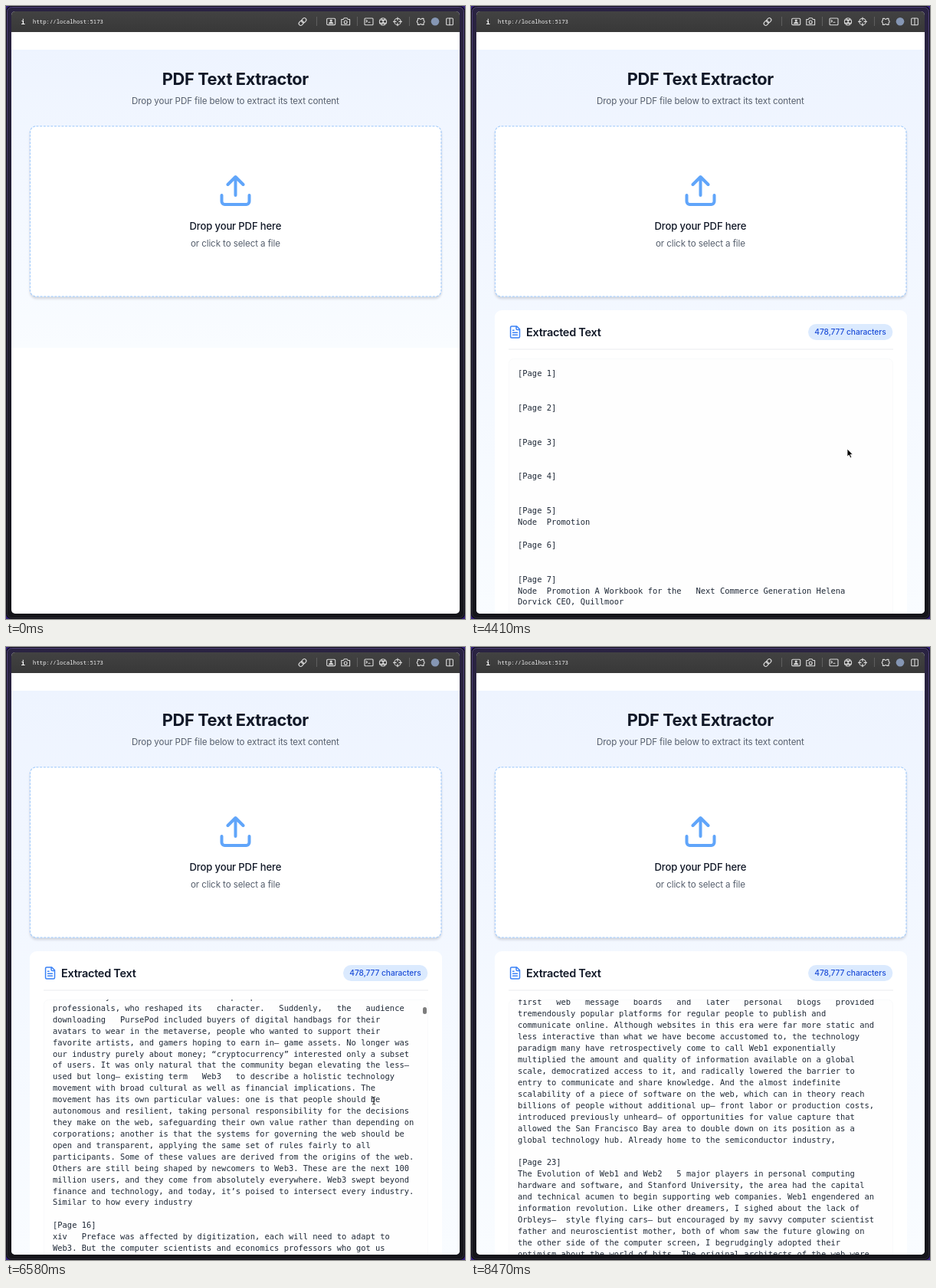
Write an HTML page that moves like this. It is 599x800 px and loops after 8610 ms.

```html
<!DOCTYPE html>
<html lang="en">
<head>
<meta charset="utf-8">
<title>PDF Text Extractor</title>
<style>
  html, body { margin: 0; width: 100%; height: 100%; overflow: hidden; }
  body { position: relative; background: #1b1a26; }
  svg { position: absolute; left: 0; top: 0; width: 599px; height: 800px; }
  text { font-family: Inter, sans-serif; }
  .mid { text-anchor: middle; }
  .title { font-size: 21.8px; font-weight: 700; letter-spacing: -.36px; fill: #111827; }
  .sub { font-size: 11.6px; letter-spacing: -.1px; fill: #565f6d; }
  .lead { font-size: 13.1px; font-weight: 500; letter-spacing: -.16px; fill: #111827; }
  .head { font-size: 14.5px; font-weight: 600; letter-spacing: -.27px; fill: #111827; }
  .count { font-size: 10.2px; font-weight: 500; letter-spacing: -.05px; fill: #1d4ed8; }
  .url { font: 500 7.3px "Noto Sans Mono", monospace; fill: #f2f2f2; }
  .line { fill: none; stroke-width: 2; stroke-linecap: round; stroke-linejoin: round; }
  #scroller { position: absolute; left: 49px; top: 460px; width: 502px; height: 333px; overflow: hidden; }
  pre { position: absolute; left: 12px; top: 12px; margin: 0; color: #1f2937;
        font: 10.44px/14.92px "DejaVu Sans Mono", monospace; }
  #thumb { position: absolute; left: 494.5px; top: 0; width: 5px; height: 9px; border-radius: 2.5px; background: #7d7d7d; }
</style>
</head>
<body>
<svg viewBox="0 0 599 800">
  <defs>
    <linearGradient id="edge" x2="0" y2="1">
      <stop stop-color="#2a2342"/><stop offset=".45" stop-color="#201d2f"/><stop offset="1" stop-color="#15151a"/>
    </linearGradient>
    <linearGradient id="rim" x2="0" y2="1">
      <stop stop-color="#54457e"/><stop offset=".5" stop-color="#3b3454"/><stop offset="1" stop-color="#2c2c33"/>
    </linearGradient>
    <linearGradient id="bar" x2="0" y2="1"><stop stop-color="#424242"/><stop offset="1" stop-color="#383838"/></linearGradient>
    <linearGradient id="sky" x2="0" y2="1"><stop stop-color="#eef4ff"/><stop offset="1" stop-color="#f9fcff"/></linearGradient>
    <filter id="shadow" x="-5%" y="-5%" width="110%" height="115%">
      <feDropShadow dx="0" dy="2.5" stdDeviation="1.8" flood-color="#1e293b" flood-opacity=".2"/>
    </filter>
    <clipPath id="window"><rect x="7" y="7" width="585" height="786" rx="5"/></clipPath>
  </defs>
  <rect width="599" height="800" fill="#35207c"/>
  <rect width="599" height="800" rx="7" fill="#0d0c14"/>
  <rect x="1.5" y="1.5" width="596" height="797" rx="6" fill="url(#edge)" stroke="url(#rim)"/>
  <g clip-path="url(#window)">
    <rect x="7" y="7" width="585" height="786" fill="#fff"/>
    <rect x="7" y="7" width="585" height="27" fill="url(#bar)"/>
    <rect id="page" x="7" y="57" width="585" height="389" fill="url(#sky)"/>
  </g>

  <text x="19.6" y="23.6" style="font:700 9px 'DejaVu Sans Mono',monospace" fill="#fff">i</text>
  <text class="url" x="35" y="22.9">http://localhost:5173</text>
  <g fill="none" stroke="#dcdcdc" stroke-width="1.1" stroke-linecap="round" stroke-linejoin="round">
    <path stroke="#5e5e5e" stroke-linecap="butt" d="M405.5 14v12M458.5 14v12M526.5 14v12"/>
    <g transform="rotate(-45 387 20.5)"><rect x="381.2" y="18" width="6.6" height="5" rx="2.5"/><rect x="386.2" y="18" width="6.6" height="5" rx="2.5"/></g>
    <rect x="418.7" y="16.2" width="11" height="8.4" rx="1.2"/>
    <path d="M421.5 22.6q2.7-3 5.4 0z" fill="#dcdcdc"/><circle cx="424.2" cy="19" r="1" fill="#dcdcdc"/>
    <path d="M437.8 17.5h2.4l1.2-1.8h3.6l1.2 1.8h2.4v7.3h-10.8z"/><circle cx="443.2" cy="21" r="2"/>
    <rect x="468" y="16" width="11" height="8.8" rx="1"/><path d="M470 18.4l1.5 1.3-1.5 1.3M473 21.3h2"/>
    <circle cx="492" cy="20.4" r="4.6"/><path d="M488 18.2h7.6M487.8 22.4h8M490.2 16.2l3.8 8M494.2 16.4l-4 7.8"/>
    <circle cx="511" cy="20.4" r="4.2"/><path d="M511 15v3.4M511 22.4v3.4M505.6 20.4h3.4M513 20.4h3.4"/>
    <path d="M537.4 16.4h2.4a1.5 1.5 0 0 0 2.8 0h2.4v2.4a1.7 1.7 0 0 1 0 3.2v2.4h-2.4a1.5 1.5 0 0 0-2.8 0h-2.4v-2.4a1.7 1.7 0 0 1 0-3.2z"/>
    <rect x="574.7" y="16" width="8.6" height="8.8" rx="1"/><path d="M579 16v8.8"/>
  </g>
  <circle cx="560" cy="20.3" r="5.3" fill="#8596b4"/>

  <text class="title mid" x="299.3" y="103.2">PDF Text Extractor</text>
  <text class="sub mid" x="299.4" y="127.6">Drop your PDF file below to extract its text content</text>

  <rect x="31.5" y="156.8" width="536.5" height="222.4" rx="8" fill="#fff" filter="url(#shadow)"/>
  <rect x="31.5" y="156.8" width="536.5" height="222.4" rx="8" fill="none" stroke="#abd0fb" stroke-width="1.25" stroke-dasharray="3 1.7"/>
  <g id="upload" class="line" stroke="#60a5fa" transform="translate(275.5 217) scale(2)">
    <path d="M21 15v4a2 2 0 0 1-2 2H5a2 2 0 0 1-2-2v-4M17 8l-5-5-5 5M12 3v12"/>
  </g>
  <g class="line" stroke="#3b82f6" transform="translate(275.5 217) scale(2)">
    <path id="spinner" d="M21 12a9 9 0 1 1-6.219-8.56"/>
  </g>
  <text id="lead" class="lead mid" x="299.4" y="291.6"></text>
  <text id="hint" class="sub mid" x="299.4" y="313.8"></text>

  <g id="result" clip-path="url(#window)">
    <rect x="31" y="397" width="538" height="420" rx="9" fill="#fff"/>
    <g class="line" stroke="#3b82f6" transform="translate(48.6 416.6) scale(.746)">
      <path d="M15 2H6a2 2 0 0 0-2 2v16a2 2 0 0 0 2 2h12a2 2 0 0 0 2-2V7zM14 2v4a2 2 0 0 0 2 2h4M10 9H8M16 13H8M16 17H8"/>
    </g>
    <text class="head" x="72" y="430.7">Extracted Text</text>
    <rect x="440" y="415" width="110.3" height="21" rx="10.5" fill="#dbeafe"/>
    <text class="count mid" x="495" y="429.4">478,777 characters</text>
    <path d="M49 448h502" stroke="#e9ebef"/>
    <rect x="49.5" y="460.5" width="501" height="350" rx="6" fill="#fefefe" stroke="#f9fafb"/>
  </g>
</svg>

<div id="scroller"><pre id="doc"></pre><div id="thumb"></div></div>

<svg viewBox="0 0 599 800">
  <g id="cursor">
    <path id="arrow" d="M0 0v10l2.3-2 1.7 3.8 1.7-.8L4.1 7.3h3.1z" fill="#000" stroke="#fff" stroke-width=".8"/>
    <path id="beam" d="M-2-5q2 0 2 1.5Q0-5 2-5M0-3.5v7M-2 5q2 0 2-1.5Q0 5 2 5M-1 1.5h2" fill="none" stroke="#222"/>
  </g>
</svg>

<script>
const LOOP = 8610, STEP = 70, PROCESS = 1540, DONE = 3360;
const $ = id => document.getElementById(id);

const PHRASES = ["the early web", "people who build communities", "a new kind of ownership", "and the tools they use",
  "in the years that followed", "with open protocols", "creators and their audiences", "began to change",
  "how value moves online", "for brands of every size", "across the whole industry.", "This shift", "is only beginning,",
  "because trust", "must be earned", "by listening first.", "Marketers", "learned to tell", "a different story"];

// Wraps seeded phrases into n lines for the pages that only rush past.
function filler(n, seed) {
  const lines = [];
  let line = "";
  while (lines.length < n) {
    seed = (seed * 1103 + 377) % 65521;
    for (const word of PHRASES[seed % PHRASES.length].split(" ")) {
      if ((line + word).length > 74) { lines.push(line.trim()); line = ""; }
      line += word + " ";
    }
  }
  return lines.slice(0, n).join("\n");
}

const TEXT = `[Page 1]


[Page 2]


[Page 3]


[Page 4]


[Page 5]
Node  Promotion

[Page 6]


[Page 7]
Node  Promotion A Workbook for the   Next Commerce Generation Helena
Dorvick CEO, Quillmoor

[Page 8]
Copyright © 2023 by Hale Torby & Kent, Inc. All rights reserved. Published
by Hale Torby & Kent, Inc., Velbrun, Far Tessin. Published simultaneously
in Canada. No part of this publication may be reproduced, stored in a
retrieval system, or transmitted in any form or by any means, electronic,
mechanical, photocopying, recording, scanning, or otherwise, except as
permitted under Section 107 or 108 of the 1976 United States Copyright Act,
without either the prior written permission of the Publisher, or
authorization through payment of the appropriate per– copy fee to the
Facsimile Allowance Bureau, Inc., 000 Fernmoor Drive, Calwick, ZZ 00000,
(555) 010– 0142, fax (555) 010– 0187, or on the Web at www.copyright.com.
Requests to the Publisher for permission should be addressed to the
Permissions Department, Hale Torby & Kent, Inc., 909 Larch Street, Velbrun,
${filler(27, 11)}

[Page 9]
To Ned, for your patience while I wrote this book on our vacation.

[Page 10]


[Page 11]
ix  Contents  Preface   xi  Part 1   What Is Web3?   1  Chapter 1   The
Evolution of Web1 and Web2   3 Chapter 2   The Evolution of Bitcoin and
Ethereum   15 Chapter 3   The Evolution of Ethereum into Web3   25 Chapter
4   The Metaverse   59  Part 2   Web3 Marketing in Theory and Practice   67
Chapter 5   Inventing Web3 Marketing   69 Chapter 6   Know Your Product and
Your Audience   83 Chapter 7   Build a Marketing Team   99 Chapter 8   Set
Key Metrics   105

[Page 12]
x   Contents  Part 3   The Web3 Marketing Funnel   111  Chapter 9
Introducing the Web3 Marketing Funnel   113 Chapter 10   Discovery   117
Chapter 11   Engagement and Use   151 Chapter 12   Retention   169  Part 4
Web3 Transformation and Web2.5   179  Chapter 13   Defining Web2.5   181
Conclusion   193 Notes   197 Acknowledgments   207 About the Author   209
Index   211

[Page 13]


[Page 14]
${filler(32, 23)}

[Page 15]
${filler(32, 37)}
professionals, who reshaped its   character.   Suddenly,   the   audience
downloading   PursePod included buyers of digital handbags for their
avatars to wear in the metaverse, people who wanted to support their
favorite artists, and gamers hoping to earn in– game assets. No longer was
our industry purely about money; “cryptocurrency” interested only a subset
of users. It was only natural that the community began elevating the less–
used but long– existing term   Web3   to describe a holistic technology
movement with broad cultural as well as financial implications. The
movement has its own particular values: one is that people should be
autonomous and resilient, taking personal responsibility for the decisions
they make on the web, safeguarding their own value rather than depending on
corporations; another is that the systems for governing the web should be
open and transparent, applying the same set of rules fairly to all
participants. Some of these values are derived from the origins of the web.
Others are still being shaped by newcomers to Web3. These are the next 100
million users, and they come from absolutely everywhere. Web3 swept beyond
finance and technology, and today, it’s poised to intersect every industry.
Similar to how every industry

[Page 16]
xiv   Preface was affected by digitization, each will need to adapt to
Web3. But the computer scientists and economics professors who got us
${filler(32, 51)}

[Page 17]
${filler(32, 67)}
in Web3, and how it is the key to unlock sustainable, long– term growth for
Web3 projects–  giving them, I believe, the power to outcompete traditional
and Web2 businesses over time. Whether the projects you support end up
beamed down from a Marlo Square digital billboard, spotted on the
fashionable streets of the metaverse, or atop the rankings on Yield Hare, I
hope every marketer

[Page 18]
xvi   Preface has their own version of the experience I had in the Geneva
airport. My hope is that by the end of this book, you will gain the
confidence to seize the opportunity to shape the future of Web3. When you
are ready use the code and instructions in the front of this book to claim
your NFT membership to the Node Promotion community. There you will find
more educational resources and training programs, as well as mentors and
potential collaborators. I look forward to meeting you there, and I hope
you enjoy the book.

[Page 19]
PART 1 What Is Web3?

[Page 20]


[Page 21]
${filler(30, 83)}

[Page 22]
${filler(14, 97)}
first   web   message   boards   and   later   personal   blogs   provided
tremendously popular platforms for regular people to publish and
communicate online. Although websites in this era were far more static and
less interactive than what we have become accustomed to, the technology
paradigm many have retrospectively come to call Web1 exponentially
multiplied the amount and quality of information available on a global
scale, democratized access to it, and radically lowered the barrier to
entry to communicate and share knowledge. And the almost indefinite
scalability of a piece of software on the web, which can in theory reach
billions of people without additional up– front labor or production costs,
introduced previously unheard– of opportunities for value capture that
allowed the San Francisco Bay area to double down on its position as a
global technology hub. Already home to the semiconductor industry,

[Page 23]
The Evolution of Web1 and Web2   5 major players in personal computing
hardware and software, and Stanford University, the area had the capital
and technical acumen to begin supporting web companies. Web1 engendered an
information revolution. Like other dreamers, I sighed about the lack of
Orbleys–  style flying cars– but encouraged by my savvy computer scientist
father and neuroscientist mother, both of whom saw the future glowing on
the other side of the computer screen, I begrudgingly adopted their
optimism about the world of bits. The original architects of the web were
`;
$("doc").textContent = TEXT;

// Rows are [time, ...values], joined by straight segments.
const SCROLL = [[4690, 0], [5110, 204], [5810, 936.5], [6580, 2336], [7420, 3653.5], [7770, 4330], [8120, 4701]];
const CURSOR = [[490, 588, 610], [770, 420, 330], [1540, 420, 330], [1960, 455, 448], [3360, 455, 448],
  [4060, 491, 578], [5110, 491, 578], [5810, 489, 578], [6580, 480, 592], [7420, 459, 588], [7910, 459, 588], [8330, 560, 800]];
const THUMB = [[4620, 0], [4690, 1], [8120, 1], [8400, 0]];

function at(table, t) {
  if (t <= table[0][0]) return table[0].slice(1);
  const i = table.findIndex(row => row[0] > t);
  if (i < 0) return table.at(-1).slice(1);
  const a = table[i - 1], b = table[i], k = (t - a[0]) / (b[0] - a[0]);
  return a.slice(1).map((v, j) => v + (b[j + 1] - v) * k);
}

const show = (id, on) => { $(id).style.visibility = on ? "visible" : "hidden"; };

function draw(now) {
  const t = Math.floor(now % LOOP / STEP) * STEP;
  const busy = t >= PROCESS && t < DONE, done = t >= DONE;

  show("upload", !busy);
  show("spinner", busy);
  show("result", done);
  show("scroller", done);
  $("page").setAttribute("height", done ? 736 : 389);
  $("spinner").setAttribute("transform", `rotate(${(t - 1520) * .36} 12 12)`);
  const pageNo = Math.min(239, Math.round(1 + 237 * (t - PROCESS) / 1680));
  $("lead").textContent = busy ? "Processing PDF" : "Drop your PDF here";
  $("hint").textContent = busy ? `Page ${pageNo} of 239` : "or click to select a file";

  const [y] = at(SCROLL, t);
  $("doc").style.transform = `translateY(${-Math.round(y)}px)`;
  $("thumb").style.transform = `translateY(${1.3 + y / 270}px)`;
  $("thumb").style.opacity = at(THUMB, t)[0];

  const [cx, cy] = at(CURSOR, t), overText = t >= 6160 && t < 8050;
  const seen = t >= 490 && t < 8330;
  $("cursor").setAttribute("transform", `translate(${cx} ${cy})`);
  show("arrow", seen && !overText);
  show("beam", seen && overText);
  requestAnimationFrame(draw);
}
draw(performance.now());
</script>
</body>
</html>
```
